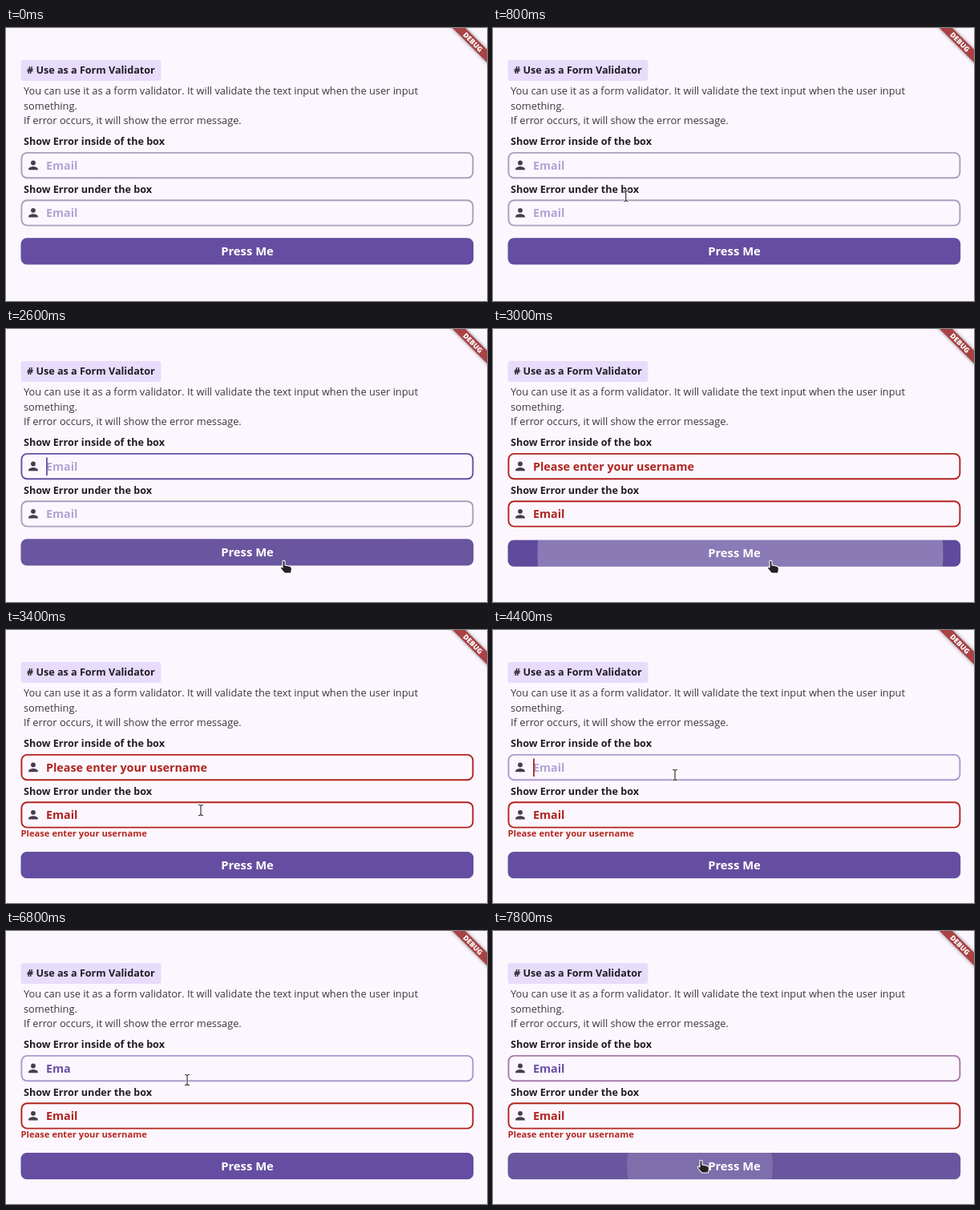
An HTML page that plays this animation: 600x341 px, repeating every 8 s.

```html
<!DOCTYPE html>
<html lang="en">
<head>
<meta charset="utf-8">
<title>Form validator</title>
<style>
  html, body { margin: 0; width: 100%; height: 100%; overflow: hidden; background: #fcf7fe; }
  svg { display: block; width: 100%; height: 100%; font: 700 12.6px "Open Sans", "Noto Sans", sans-serif; fill: #211d25; }
  .body { font-weight: 400; font-size: 12.8px; fill: #3b373f; }
  .input { font-size: 14.3px; }
  .box { fill: none; stroke-width: 1.9; }
  .error { font-size: 11.2px; fill: #b3261e; }
</style>
</head>
<body>
<svg viewBox="0 0 600 341" preserveAspectRatio="none">
  <defs>
    <path id="person" fill="#453f4b" transform="translate(25.2 -8.8) scale(.73)"
      d="M12 12a4 4 0 1 0 0-8a4 4 0 0 0 0 8zm0 2c-2.67 0-8 1.34-8 4v2h16v-2c0-2.66-5.33-4-8-4z"/>
    <clipPath id="buttonShape"><rect x="18.5" y="262.3" width="564.7" height="33.2" rx="7.5"/></clipPath>
    <filter id="blur" x="-20%" y="-100%" width="140%" height="300%"><feGaussianBlur stdDeviation="2.2"/></filter>
  </defs>

  <rect x="18.5" y="40" width="175" height="26" rx="3.5" fill="#e7dcfb"/>
  <text x="26" y="57.3">&#35; Use as a Form Validator</text>
  <g class="body">
    <text x="22" y="83.3">You can use it as a form validator. It will validate the text input when the user input</text>
    <text x="22" y="101.8">something.</text>
    <text x="22" y="120.2">If error occurs, it will show the error message.</text>
  </g>

  <text x="22" y="146.3">Show Error inside of the box</text>
  <rect id="box1" class="box" x="19.4" y="155.9" width="563" height="31.4" rx="7"/>
  <use href="#person" y="171.5"/>
  <text id="value1" class="input" x="50" y="177"></text>
  <rect id="caret" y="160.5" width="1.8" height="22.5"/>

  <text x="22" y="205.6">Show Error under the box</text>
  <rect id="box2" class="box" x="19.4" y="215.2" width="563" height="31.4" rx="7"/>
  <use href="#person" y="230.8"/>
  <text id="value2" class="input" x="50" y="236.2">Email</text>
  <text id="message" class="error" x="18.5" y="258.3">Please enter your username</text>

  <g id="button">
    <g clip-path="url(#buttonShape)">
      <rect id="buttonFill" x="18" y="262" width="566" height="34"/>
      <circle id="ripple" cy="279" fill="#fff"/>
    </g>
    <text x="301" y="284" text-anchor="middle" font-size="14.8" fill="#fff">Press Me</text>
  </g>

  <g transform="translate(582.5 17.5) rotate(45)">
    <rect x="-40" y="-5.6" width="80" height="11.2" filter="url(#blur)" opacity=".5" fill="#000"/>
    <rect x="-40" y="-5.6" width="80" height="11.2" fill="#a94245"/>
    <text y="3.2" text-anchor="middle" font-size="8.8" font-weight="800" fill="#fff">DEBUG</text>
  </g>

  <g id="beam" fill="none" stroke-linecap="round">
    <path d="M-2.5-6.5Q0-6.5 0-5Q0-6.5 2.5-6.5M0-5V5M-2.5 6.5Q0 6.5 0 5Q0 6.5 2.5 6.5" stroke="#fff" stroke-width="2.6"/>
    <path d="M-2.5-6.5Q0-6.5 0-5Q0-6.5 2.5-6.5M0-5V5M-2.5 6.5Q0 6.5 0 5Q0 6.5 2.5 6.5" stroke="#222" stroke-width="1.1"/>
  </g>
  <path id="hand" fill="#222" stroke="#fff" stroke-width="1.1" stroke-linejoin="round"
    d="M-2-3Q-.5-4.5 1-3V2L7 3.2Q9.5 4 9.5 6.5L8.5 12H.5L-4.5 6Q-5 4-3.2 4L-2 5z"/>
</svg>
<script>
const $ = id => document.getElementById(id);
const set = (id, attrs) => {
  for (const name in attrs) $(id).setAttribute(name, attrs[name]);
};

const LOOP = 8000, STEP = 200;
const IDLE = '#aa9ebd', LILAC = '#ab98cd', HINT = '#b3a3d6', PURPLE = '#674fa5', RED = '#b0241f';

// Each key is [time, value]; the latest key reached holds.
const hold = (t, keys) => keys.filter(key => key[0] <= t).pop()[1];

// Each key is [time, x, y]; positions between keys are eased.
const pointerPath = [
  [400, 205, 312], [1000, 152, 174], [1600, 152, 174], [2600, 347, 293], [3000, 347, 293],
  [3400, 243, 225], [3800, 234, 188], [4400, 227, 181], [6000, 227, 181], [6400, 226, 186],
  [7000, 226, 186], [7600, 260, 290], [8000, 260, 290]
];
function pointerAt(t) {
  const next = pointerPath.findIndex(key => key[0] > t);
  const [t0, x0, y0] = pointerPath[next - 1], [t1, x1, y1] = pointerPath[next];
  const p = (t - t0) / (t1 - t0), eased = p * p * (3 - 2 * p);
  return [x0 + (x1 - x0) * eased, y0 + (y1 - y0) * eased];
}

function drawFields(t) {
  set('box1', { stroke: hold(t, [[0, IDLE], [1000, PURPLE], [2800, '#8c3c64'], [3000, RED], [4200, LILAC], [7800, '#a57ba8']]) });
  set('box2', { stroke: hold(t, [[0, IDLE], [2800, '#ac6470'], [3000, RED]]) });
  set('value2', { fill: t < 3000 ? HINT : RED });

  const typed = hold(t, [[0, 0], [5600, 1], [6000, 2], [6200, 3], [7000, 4], [7200, 5]]);
  const invalid = t >= 3000 && t < 4200;
  const value = $('value1');
  value.textContent = invalid ? 'Please enter your username' : 'Email'.slice(0, typed || 5);
  set('value1', { fill: invalid ? RED : typed ? PURPLE : HINT });

  const caretOn = hold(t, [[0, 0], [1000, 1], [1200, 0], [1600, 1], [2000, 0], [2400, 1], [2800, 0],
    [4200, 1], [4800, 0], [5200, 1], [6800, 0], [7000, 1], [7600, 0]]);
  set('caret', {
    x: 50 + (typed ? value.getComputedTextLength() : 0),
    fill: t < 4000 ? PURPLE : RED,
    opacity: caretOn
  });
  set('message', { opacity: hold(t, [[0, 0], [3200, .8], [3400, 1]]) });
}

function drawButton(t, hovered) {
  const shift = hold(t, [[0, 0], [3000, 1.2], [3200, 14.7]]);
  const [x, radius, opacity] = hold(t, [
    [0, [0, 0, 0]], [2800, [340, 91, .14]], [3000, [308.5, 253, .27]],
    [3200, [301, 283, .1]], [3400, [0, 0, 0]], [7800, [258, 91, .14]]
  ]);
  set('button', { transform: `translate(0 ${shift})` });
  set('buttonFill', { fill: t === 3000 ? '#5f4a9c' : hovered ? '#69569e' : '#654ea1' });
  set('ripple', { cx: x, r: radius, opacity });
}

function draw(t) {
  const visible = t >= 400;
  const [x, y] = pointerAt(Math.max(t, 400));
  const top = t < 3200 ? 262 : 277;
  const hovered = visible && y > top && y < top + 33;
  const transform = `translate(${x} ${y})`;
  set('beam', { transform, opacity: +(visible && !hovered) });
  set('hand', { transform, opacity: +hovered });
  drawFields(t);
  drawButton(t, hovered);
}

function frame() {
  const t = performance.now() % LOOP;
  draw(Math.floor(t / STEP) * STEP);
  requestAnimationFrame(frame);
}
frame();
</script>
</body>
</html>
```
